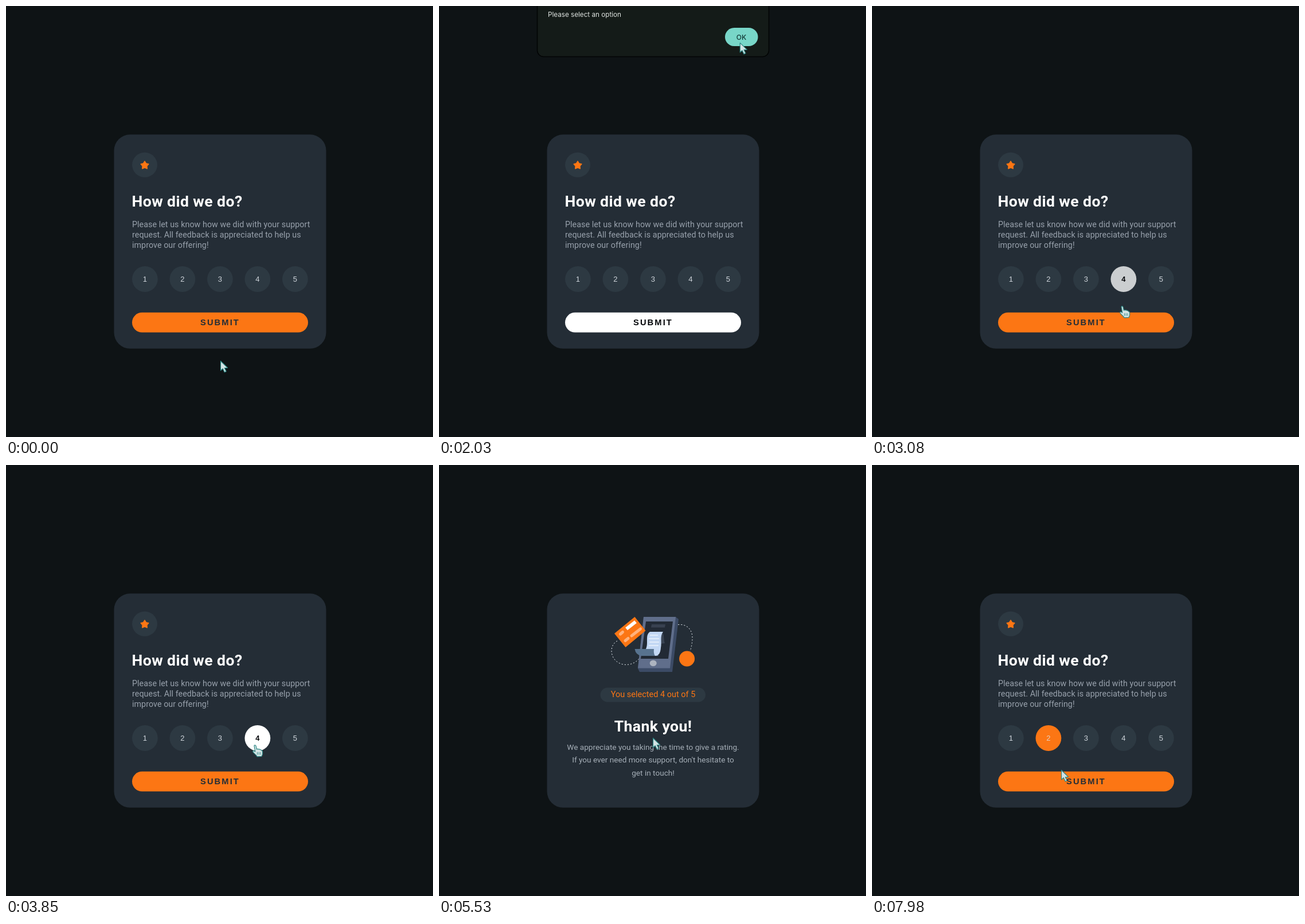
These frames come from a looping animation (745 px wide and 752 px high, 8000 ms). An HTML page:

```html
<!DOCTYPE html>
<html lang="en">
<head>
<meta charset="utf-8">
<title>Rating card</title>
<style>
  html, body { margin: 0; width: 100%; height: 100%; overflow: hidden; background: #0e1315; }
  svg { display: block; width: 745px; height: 752px; }
  text { font-family: Roboto, "Noto Sans", sans-serif; }
  .title { font-size: 26.6px; font-weight: 700; letter-spacing: .4px; fill: #fff; }
  .copy { font-size: 14.3px; letter-spacing: .05px; fill: #98a1ac; }
  .thanks-copy { font-size: 13.6px; fill: #a5aeb7; }
  .mid { text-anchor: middle; }
  .num { font: 13px "Liberation Sans", Arial, sans-serif; text-anchor: middle; }
  .submit { font: 700 14.7px "Liberation Sans", Arial, sans-serif; letter-spacing: 2.1px; }
  .sys { font-family: Inter, sans-serif; }
  .cursor { stroke: #2a8583; stroke-width: 1.2; stroke-linejoin: round; fill: #d3e3e4; }
</style>
</head>
<body>
<svg viewBox="0 0 745 752">
  <rect x="188.5" y="224.3" width="370" height="373.5" rx="28" fill="#242d36"/>

  <g id="form">
    <ellipse cx="242" cy="277.2" rx="22" ry="21.6" fill="#2d3942"/>
    <path id="star" fill="#fc7614" stroke="#fc7614" stroke-width="1.6" stroke-linejoin="round"/>
    <text class="title" x="219.5" y="350">How did we do?</text>
    <text class="copy" x="220" y="386">Please let us know how we did with your support</text>
    <text class="copy" x="220" y="404">request. All feedback is appreciated to help us</text>
    <text class="copy" x="220" y="422">improve our offering!</text>
    <g id="options"></g>
    <rect id="button" x="220" y="534.8" width="307" height="34.8" rx="17.4"/>
    <text id="label" class="submit" x="339" y="556.8">SUBMIT</text>
  </g>

  <g id="thanks">
    <g fill="none" stroke="#dfe4ea" stroke-dasharray="2.2 3">
      <path d="M311 307C299 313 298 330 307 340C318 352 338 351 349 338"/>
      <path d="M417 278.5C434 277 443 289 442 304Q441.5 315 438 325"/>
    </g>
    <path d="M357 265H413L418 269L407 361H350L347 355Z" fill="#3c4b66"/>
    <path d="M357 265H413L403 354.5H347Z" fill="#606e8b"/>
    <path d="M361 273H408L400 338H352Z" fill="#222a35"/>
    <path d="M371 278H395L394 283.5H370Z" fill="#384150"/>
    <path d="M388 291C394 295 391 303 394 311L385 312Z" fill="#3a4453"/>
    <path d="M341.5 321H376Q378 331 384 333H353Q343 331 341.5 321Z" fill="#58738f"/>
    <path d="M368 291H391C385 299 389 308 387 319Q386 333 377 333Q374 329 375 321H361C366 311 359 297 368 291Z" fill="#c3d8f5"/>
    <path d="M368 297H382M366 303H384M367 309H384M366 315H383" stroke="#fff"/>
    <ellipse cx="373.7" cy="345.7" rx="6" ry="5.2" fill="#adb4c0"/>
    <path d="M306 294L341.5 265L360.5 289L325.5 318Z" fill="#fc7614"/>
    <path d="M327 286L343 273.5" stroke="#fff" stroke-width="6"/>
    <path d="M316.5 295L320.5 291.5M325 306.5L330 302.5M336 298L351.5 286"
      stroke="#ffb27c" stroke-width="5" stroke-linecap="round"/>
    <circle cx="432.6" cy="338" r="13.5" fill="#fc7614"/>
    <rect x="281.5" y="388.5" width="183.5" height="25" rx="12.5" fill="#2d3942"/>
    <text class="mid" x="373.5" y="405" font-size="14.5" fill="#fc7614">You selected 4 out of 5</text>
    <text class="title mid" x="373.5" y="464.8">Thank you!</text>
    <text class="thanks-copy mid" x="373.5" y="496.7">We appreciate you taking the time to give a rating.</text>
    <text class="thanks-copy mid" x="373.5" y="519">If you ever need more support, don't hesitate to</text>
    <text class="thanks-copy mid" x="373.5" y="541.5">get in touch!</text>
  </g>

  <g id="alert">
    <rect x="171.5" y="-20" width="404" height="108.5" rx="11" fill="#141b18" stroke="#020404" stroke-width="1.5"/>
    <text class="sys" x="190" y="18.8" font-size="11.7" fill="#e0e5e2">Please select an option</text>
    <rect x="499" y="38" width="57.5" height="32" rx="16" fill="#78d6c8"/>
    <text class="sys mid" x="527.5" y="58.5" font-size="12" font-weight="500" fill="#123a36">OK</text>
  </g>

  <path id="arrow" class="cursor" d="M.5 .5V17L4.2 13.7L7.2 20L10.2 18.6L7.3 12.6L12.6 12.3Z"/>
  <g id="hand" class="cursor">
    <path d="M-2 1Q-1.4 -.8 .2 0Q1 .5 1.3 2L2.4 7Q3.6 5.8 5 6.9Q6.4 6 7.7 7.4Q9.5 6.8 10.4 8.8Q12.4 9 12.6 11.4V15Q12.4 17 11 19.3L3.2 19.8Q1.6 17 -1.4 14.6L-4 11.8Q-4.8 10 -3.2 9.6Q-1.8 9.6 -.2 11.2Z"/>
    <path d="M3.5 12V16.5M6.2 12V16.5M8.9 12V16.5" stroke-width=".9"/>
  </g>
</svg>
<script>
const LOOP = 8000, STEP = 70, FADE = 280;
const DARK = [45, 57, 66], ORANGE = [252, 118, 20], WHITE = [255, 255, 255];
const $ = id => document.getElementById(id);

// Pointer glides: start time, end time, x, y. It rests in between.
const START = [374, 619];
const GLIDES = [
  [0, 350, 340, 480], [350, 420, 330, 517], [700, 770, 382, 568], [840, 1050, 363, 555],
  [1260, 2100, 528, 54],
  [2100, 2450, 442, 570], [2450, 2590, 435, 530], [2590, 2870, 437, 480],
  [2870, 3220, 437, 548], [3220, 3850, 435, 489],
  [3850, 4480, 411, 558], [4550, 4620, 411, 542],
  [5250, 5390, 326, 290], [5390, 5530, 373, 476],
  [6580, 7140, 326, 474], [7420, 7700, 254, 433], [7700, 7980, 330, 532]
];
// When the pointer is over each control.
const HOVERS = {
  button: [[140, 2520], [3080, 3360], [4130, 4620]],
  2: [[7140, 7630]],
  3: [[6650, 7210]],
  4: [[2730, 3010], [3500, 4060]]
};
const HAND = [[210, 910], [2450, 5040], [7210, 7630]];

const clamp = v => Math.min(1, Math.max(0, v));
const smooth = k => k * k * (3 - 2 * k);
const mix = (a, b, k) => a + (b - a) * k;
const color = (a, b, k) => `rgb(${a.map((v, i) => Math.round(mix(v, b[i], k)))})`;
const within = (t, a, b) => t >= a && t < b;
const show = (id, on) => { $(id).style.display = on ? "" : "none"; };

// Rises after each span's start and falls after its end.
const level = (t, spans = [], fade = FADE) =>
  spans.reduce((sum, [a, b]) => sum + clamp((t - a) / fade) - clamp((t - b) / fade), 0);

const pointer = t => GLIDES.reduce(([x, y], [a, b, toX, toY]) => {
  const k = smooth(clamp((t - a) / (b - a)));
  return [mix(x, toX, k), mix(y, toY, k)];
}, START);

function add(parent, tag, attrs) {
  const el = document.createElementNS("http://www.w3.org/2000/svg", tag);
  for (const name in attrs) el.setAttribute(name, attrs[name]);
  return parent.appendChild(el);
}

const starPoints = Array.from({ length: 10 }, (_, i) => {
  const r = i % 2 ? 4 : 7.1, a = (i / 5 - .5) * Math.PI;
  return `${242 + r * Math.cos(a)} ${278 + r * Math.sin(a)}`;
});
$("star").setAttribute("d", `M${starPoints.join("L")}Z`);

const options = [1, 2, 3, 4, 5].map(n => {
  const x = 242.4 + (n - 1) * 65.5;
  const disc = add($("options"), "circle", { cx: x, cy: 476.5, r: 22.4 });
  const text = add($("options"), "text", { class: "num", x, y: 481 });
  text.textContent = n;
  return { n, disc, text };
});

function draw(t) {
  const done = within(t, 4620, 6650);
  show("form", !done);
  show("thanks", done);

  const hot = level(t, HOVERS.button);
  $("button").style.fill = color(ORANGE, WHITE, hot);
  $("label").style.fill = hot > .4 ? "#05070a" : "#242d36";

  const choice = within(t, 3920, 4620) ? 4 : t >= 7560 ? 2 : 0;
  for (const { n, disc, text } of options) {
    const hover = level(t, HOVERS[n]), picked = n === choice;
    disc.style.fill = color(picked ? ORANGE : DARK, WHITE, hover);
    text.style.fill = hover > .4 ? "#05070a" : picked ? "#e3cfc1" : "#d0d6dc";
    text.style.fontWeight = hover > .4 ? 700 : 400;
  }

  $("alert").style.opacity = level(t, [[840, 2100]], 2 * STEP);

  const hand = HAND.some(([a, b]) => within(t, a, b));
  show("hand", hand);
  show("arrow", !hand);
  $(hand ? "hand" : "arrow").setAttribute("transform", `translate(${pointer(t)})`);
}

function tick() {
  const t = performance.now() % LOOP;
  draw(Math.floor(t / STEP) * STEP);
  requestAnimationFrame(tick);
}
tick();
</script>
</body>
</html>
```
